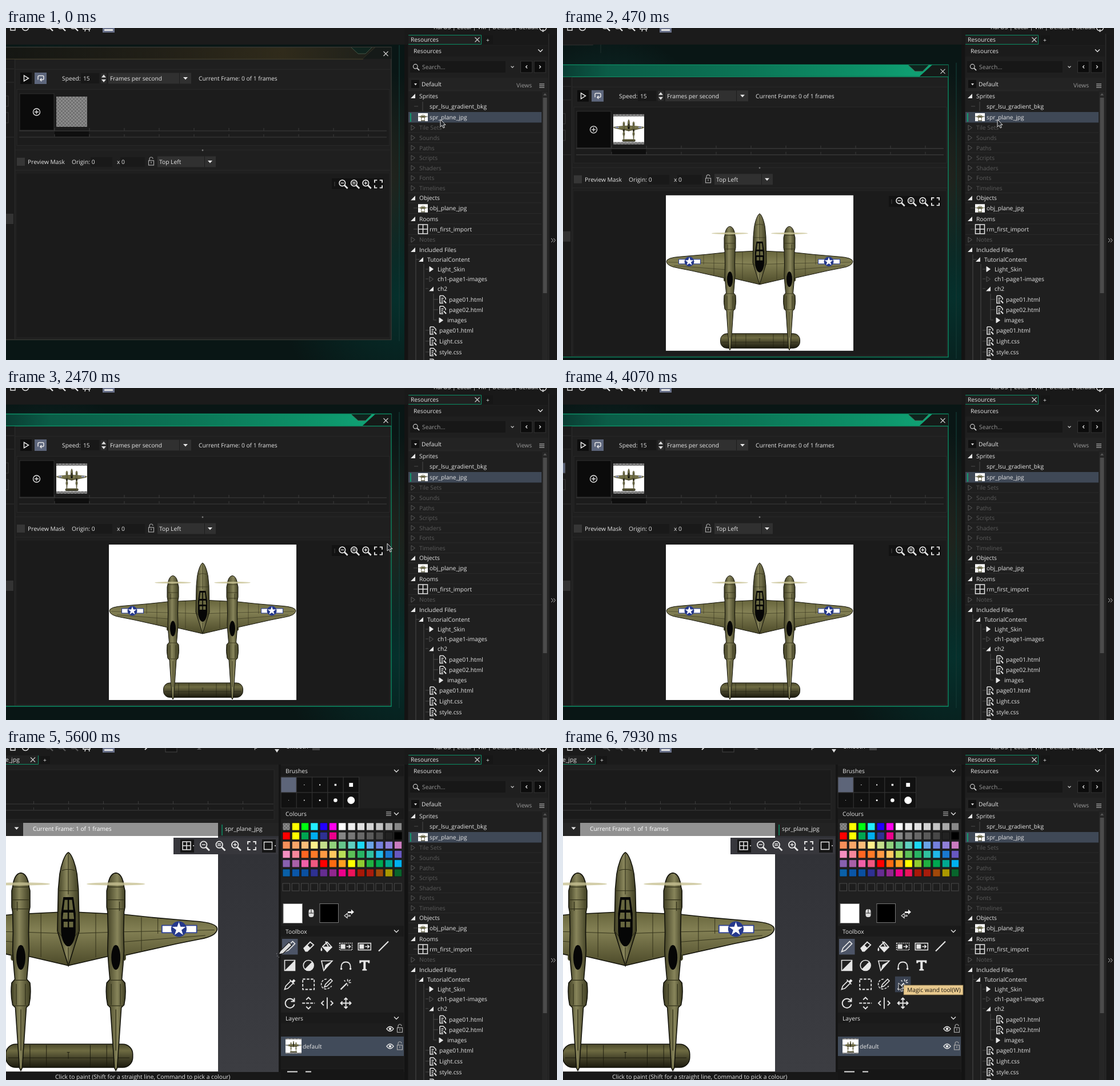
Recreate the animation shown at these times as an HTML page. Size 964 by 581 pixels, loop 8 s.

```html
<!DOCTYPE html>
<html lang="en">
<head>
<meta charset="utf-8">
<title>Sprite editor</title>
<style>
html, body { margin: 0; width: 100%; height: 100%; overflow: hidden; background: #1b1b1b; }
svg { display: block; width: 100vw; height: 100vh; }
text { font: 10.25px "Open Sans", "Noto Sans", sans-serif; text-rendering: geometricPrecision; white-space: pre; }
</style>
</head>
<body>
<svg id="stage" viewBox="0 0 964 581" xmlns="http://www.w3.org/2000/svg"></svg>
<script>
const WHITE = '#e6e6e6', DIM = '#5a5a5a', GREEN = '#0c8f66';
const rect = (x, y, w, h, fill, extra = '') =>
  `<rect x="${x}" y="${y}" width="${w}" height="${h}" fill="${fill}" ${extra}/>`;
const text = (x, y, s, fill = WHITE, extra = '') => `<text x="${x}" y="${y}" fill="${fill}" ${extra}>${s}</text>`;
const path = (d, fill = 'none', stroke = 'none', width = 1, extra = '') =>
  `<path d="${d}" fill="${fill}" stroke="${stroke}" stroke-width="${width}" ${extra}/>`;
const line = (d, stroke = WHITE, width = 1.5, extra = '') => path(d, 'none', stroke, width, extra);
const circle = (x, y, r, fill = 'none', stroke = 'none', width = 1) =>
  `<circle cx="${x}" cy="${y}" r="${r}" fill="${fill}" stroke="${stroke}" stroke-width="${width}"/>`;
const at = (x, y, body, scale = 1) => `<g transform="translate(${x} ${y}) scale(${scale})">${body}</g>`;
const group = (id, body, extra = '') => `<g id="${id}" ${extra}>${body}</g>`;
const range = n => [...Array(n).keys()];
const plane = (x, y, scale) => at(x, y, '<use href="#plane"/>', scale);
const gradient = (id, stops, dir = 'x2="1" y2="0"') => `<linearGradient id="${id}" ${dir}>` +
  stops.map(([o, c]) => `<stop offset="${o}" stop-color="${c}"/>`).join('') + '</linearGradient>';
const glow = (id, x, y, r, color) => `<radialGradient id="${id}" gradientUnits="userSpaceOnUse" cx="${x}" cy="${y}" r="${r}">
  <stop offset="0" stop-color="${color}"/><stop offset="1" stop-color="${color}" stop-opacity="0"/></radialGradient>`;

// Icons
const chevron = (x, y, c = WHITE, s = 4) => line(`M${x - s} ${y - s / 2}l${s} ${s}l${s} ${-s}`, c, 1.3);
const dropArrow = (x, y) => path(`M${x - 4} ${y - 2}h8l-4 4.5z`, WHITE);
const cross = (x, y, s = 4) => line(`M${x - s} ${y - s}l${2 * s} ${2 * s}m0 ${-2 * s}l${-2 * s} ${2 * s}`, '#ccc', 1.2);
const burger = (x, y) => line(`M${x - 4} ${y - 3}h9m-9 3h9m-9 3h9`, '#ccc', 1.2);
const zoom = (x, y, kind = '', c = WHITE, scale = 1) => at(x, y, circle(-1.5, -1.5, 4.8, 'none', c, 1.5) +
  line('M2 2L7 7', c, 2.4) + line({ '-': 'M-4-1.5h5', '=': 'M-4-2.7h5m-5 2.3h5', '+': 'M-4-1.5h5m-2.5-2.5v5' }[kind] || '', c, 1.2), scale);
const corners = (x, y, scale = 1) => at(x, y, line('M-6-2v-4h4m4 0h4v4m0 4v4h-4m-4 0h-4v-4', WHITE, 1.7), scale);
const lock = (x, y) => at(x, y, line('M-3-1v-3a3 3 0 0 1 6 0', '#aaa', 1.2) + rect(-4.5, -1, 9, 8, 'none', 'stroke="#aaa" stroke-width="1.2"') + rect(-.6, 1, 1.2, 3, '#aaa'));
const eye = (x, y) => at(x, y, line('M-6 0Q0-8 6 0Q0 8-6 0Z', WHITE, 1.4) + circle(0, 0, 2.3, WHITE));
const fileIcon = (x, y) => at(x, y, line('M-5-6.5h6l4 4v3M-5-6.5v13h6M-2.5-2h4m-4 3h3m-3 3h3', WHITE, 1.5) + line('M2 2l4 4.5', WHITE, 2));
const grid = (x, y, s) => line(`M${x - s} ${y - s}h${2 * s}v${2 * s}h${-2 * s}zm${s} 0v${2 * s}m${-s} ${-s}h${2 * s}`, WHITE, 1.5);

function planeArt() {
  const edge = '#12120a', seam = '#33321b';
  const star = 'M' + range(10).map(i => {
    const a = i * Math.PI / 5, r = i % 2 ? 3.1 : 7.8;
    return `${(41 + r * Math.sin(a)).toFixed(1)} ${(116 - r * Math.cos(a)).toFixed(1)}`;
  }).join('L') + 'Z';
  const badge = rect(22.5, 112, 38, 8, '#fff', 'stroke="#2c3f94" stroke-width="1.1"') + circle(41, 116, 8.5, '#26398c') + path(star, '#fff');
  const wing = path('M164 97L103 100L70 103.5L26 107.3Q1 109 1 116Q2 124 20 127L45 132L103 145L121 146L164 156Z', 'url(#wing)', edge) +
    line('M4 117L103 119L164 121M14 123L103 130M66 104v17M84 103v38M134 99v48', seam, .6) +
    path('M101 144h3v5l-1.500 2l-1.500-2z'.replace(/500/g, '5'), '#3f3e22');
  const boom = path('M112 54.500C117 55 120 61 121 70L122 74V92L121 97L120.500 120L121 140Q120 156 118.500 171L122 175Q123.500 188 121 199L118 202L113.500 268L112 271L110.500 268L106 202L103 199Q100.500 188 102 175L105.500 171Q104 156 103 140L103.500 120L103 97L102 92V74L103 70C104 61 107 55 112 54.500Z'.replace(/\.500/g, '.5'), 'url(#boom)', edge) +
    line('M103 70h18M102 84h20M102.5 94h19M105 172h14M104 200h16M108 86v10M107 176v23M117 176v23M112 204v45', seam, .8) +
    '<ellipse cx="112" cy="147" rx="5" ry="13.5" fill="#060606"/>' +
    '<ellipse cx="112" cy="66.6" rx="32" ry="1.6" fill="#c9c294" opacity=".8"/>';
  const flip = body => `<g transform="matrix(-1 0 0 1 328 0)">${body}</g>`;
  return rect(0, 0, 328, 272, '#fff') +
    rect(95.5, 242, 139, 25.5, 'url(#tail)', `rx="11" stroke="${edge}"`) +
    line('M98 257H231M122 243v24M140 243v24M188 243v24M206 243v24M164 251v7m-1.5-7h3', '#1d1c0e', .6) +
    wing + boom + flip(wing + boom) +
    path('M164 32C168 34 172 46 173.5 56L175 72L176 118L164 156L152 118L153 72L154.5 56C156 46 160 34 164 32Z', 'url(#boom)', edge) +
    line('M157 52Q164 49 171 52M164 33v45M153 74h22M152 118l12 14l12-14M164 136v20', seam, .7) +
    path('M158.5 81h11l2.5 18v18c0 10-4 18-8 18s-8-8-8-18v-18z', '#060606') +
    path('M160 84h3.2v11h-4.5zm4.8 0h3.2l1.300 11h-4.500zm-6.300 14h4.700v7h-5.500zm6.300 0h4.700l.8 7h-5.500zm-6 10h4.500v6h-4.500zm6 0h4.500v6h-4.500z'.replace(/00/g, ''), '#67663f') +
    badge + at(244, 0, badge);
}

const down = 'x2="0" y2="1"';
const defs = '<defs>' +
  gradient('wing', [[0, '#66643b'], [.35, '#838054'], [1, '#4c4a29']], down) +
  gradient('boom', [[0, '#3c3b20'], [.42, '#88855b'], [1, '#3c3b20']]) +
  gradient('tail', [[0, '#4a482a'], [.28, '#6e6b42'], [.6, '#45432a'], [1, '#1c1b0e']], down) +
  gradient('active', [[0, '#0a3d33'], [.12, '#0b5c47'], [.5, '#0b7556'], [.85, '#0d946a'], [1, '#10a476']]) +
  gradient('idle', [[0, '#151713'], [.4, '#211f17'], [.75, '#302b1b'], [1, '#1d1f1a']]) +
  gradient('canvas', [[0, '#303136'], [1, '#3c3d42']], down) +
  glow('glowTeal', 80, 190, 180, '#0e3432') + glow('glowGold', 590, 290, 230, '#2e2b22') +
  glow('glowBrown', 310, 400, 150, '#38291c') + glow('glowRight', 690, 470, 210, '#05302c') +
  '<pattern id="checker" width="6" height="6" patternUnits="userSpaceOnUse">' +
  rect(0, 0, 6, 6, '#8b8b8b') + rect(0, 0, 3, 3, '#707070') + rect(3, 3, 3, 3, '#707070') + '</pattern>' +
  '<clipPath id="workClip"><rect y="29" width="697" height="552"/></clipPath><clipPath id="editClip"><rect y="131" width="371" height="436"/></clipPath>' +
  group('plane', planeArt()) + '</defs>';

const topBar = zoomColor => rect(0, 0, 697, 29, '#1b1b1b') +
  line('M8-2v6h8v-6', '#ddd', 1.5) + circle(34, -1, 5.5, 'none', '#ddd', 1.5) +
  [75, 97, 119].map(x => zoom(x, -2, '', zoomColor)).join('') +
  line('M135-2v4h12v-4m-8 4l-1 4m7-4l1 4', '#ddd', 1.5) + rect(169, -2, 21, 10, '#69718a') + rect(172, 2, 15, 3, '#e6e6e6');

function workspace() {
  const full = fill => rect(0, 29, 697, 552, fill);
  return full('#091615') + ['Teal', 'Gold', 'Brown', 'Right'].map(g => full(`url(#glow${g})`)).join('');
}

const timeline = (x0, x1, y, first) => [y, y + 11].map(v => line(`M${x0} ${v}H${x1}`, '#3c3c3c', 1.2)).join('') +
  range(10).map(i => first + 61 * i).filter(x => x < x1).map(x => line(`M${x} ${y - 5}v5m0 6v4`, '#3c3c3c', 1)).join('');

function spriteWindow() {
  const previous = rect(-2, -326, 54, 337, '#1d1d1d', 'stroke="#303030"') + rect(0, -325, 51, 18, '#131816') + path('M0-325H16L2-306H0Z', '#37352b') +
    cross(42, -316) + rect(-2, -294, 47, 18, '#212121', 'stroke="#2c2c2c"') + rect(-2, -220, 47, 227, '#222', 'stroke="#2c2c2c"') +
    line('M66-330V25', '#20302f', 1);
  const dropdown = (x, y, w, split, s) => rect(x, y, w, 19, '#303030') + rect(split, y, 1, 19, '#1d1d1d') +
    dropArrow(x + w - 10, y + 9.5) + text(x + 3, y + 13.5, s);
  return previous + line('M688 42V560', '#123530') +
    rect(0, 46, 674, 511, '#1f1f1f') +
    group('idleHead', path('M0 46H646L624 66H0Z', 'url(#idle)') + line('M0 45.5H674V557.5H0', '#343632') + line('M0 66.5H624L646 46', '#3d392a')) +
    group('activeHead', path('M0 46H646L624 66H0Z', 'url(#active)') + line('M0 45.5H674V557H0M0 66.5H674', GREEN, 1.3)) +
    path('M646 46H674V66H624Z', '#151a18') + path('M604 46H640L629 57H616Z', '#10241e') + line('M604 46L616 57H629L640 46', '#4e604f', .8) +
    cross(664.5, 57) +
    rect(0, 67, 15, 489, '#1b1b1b') + line('M15.5 67V556M0 83.5H14M0 107H14M0 203H14', '#292929') +
    rect(-3, 131, 7, 18, '#1a1a1a', 'id="editButton" stroke="#3b3b3b"') + rect(-3, 160, 7, 18, '#1a1a1a', 'stroke="#3b3b3b"') + rect(0, 337, 13, 18, '#333') +
    line('M16 84.5H672M16 225.5H672M16 261H672', '#262626') +
    rect(25, 90, 20, 20, '#0d0d0d') + line('M31.5 95v10l8-5z', WHITE, 1.5) +
    rect(50, 90, 21, 20, '#5d667c') + line('M56 102.5v-5a2 2 0 0 1 2-2h6a2 2 0 0 1 2 2v3a2 2 0 0 1-2 2h-4m2.3-2.5l-2.5 2.5l2.5 2.8', WHITE, 1.5) +
    text(98, 104, 'Speed:') + rect(131, 91, 32, 18, '#181818') + text(135, 104, '15') +
    rect(166, 91, 10, 18, '#2b2b2b') + path('M167 98.5h8l-4-5zm0 3.5h8l-4 5z', '#ddd') +
    dropdown(179, 90.5, 145, 303, 'Frames per second') + text(337, 104, 'Current Frame: 0 of 1 frames') +
    rect(19, 119.5, 652, 98, '#1c1c1c', 'stroke="#282828"') + rect(24, 127, 60, 64, '#0b0b0b', 'stroke="#303030"') +
    circle(53.5, 159, 6, 'none', WHITE, 1.3) + line('M50 159h7m-3.5-3.5v7', WHITE, 1.3) +
    rect(88, 132, 54, 53, 'url(#checker)') + group('frameThumb', plane(88, 136, .1646)) +
    rect(85, 193, 60, 9, '#0e0e0e') + timeline(23, 666, 192, 85) + circle(344, 226, 1.4, '#777') +
    rect(19, 239, 14, 14, '#363636') + text(38, 250, 'Preview Mask') + rect(148, 238, 38, 17, '#191919') + rect(200, 238, 43, 17, '#191919') +
    text(115, 250, 'Origin: 0') + text(194, 250, 'x 0') + lock(254, 245) + dropdown(265, 236.5, 102, 347, 'Top Left') +
    rect(18, 266, 653, 288, '#1b1b1b', 'stroke="#242424"') + group('preview', plane(180, 274, 1)) +
    rect(570, 275, 91, 19, '#121212') + line('M575 281v8', '#444', 1) +
    zoom(590, 285, '-', WHITE, 1.1) + zoom(610.5, 285, '=', WHITE, 1.1) + zoom(631, 285, '+', WHITE, 1.1) + corners(651.5, 285, 1.1);
}

const toolX = i => 496.5 + 32.7 * i, toolY = j => 347.5 + 33 * j;
function tools() {
  const arrows = 'M-4-6L0-10L4-6M-4 6L0 10L4 6';
  const rows = [[
    line('M-9 9l2.5-6.5L5-9l4 4L-2.5 6.5Z', WHITE, 1.7),
    line('M-8 3L3-8L9-3L-2 8H-5Z', WHITE, 1.8) + path('M-8 3L-2-3L4 3L-2 8H-5Z', WHITE),
    line('M-8 0L0-8L8 1L0 9Z M-3-9L2 0', WHITE, 1.8) + path('M-8 0H8L0 9ZM-10 1q-3 6 0 7q3-1 0-7', WHITE),
    line('M-11-6H11V6H-11Z', WHITE, 1.5, 'stroke-dasharray="2 1.5"') + rect(-9, -4, 8, 8, WHITE) + line('M1 0h7m-3-3l3 3l-3 3', WHITE, 1.6),
    line('M-11-6H11V6H-11Z', WHITE, 1.5) + rect(-9, -4, 8, 8, WHITE) + line('M1 0h7m-3-3l3 3l-3 3', WHITE, 1.6),
    line('M-8 8L9-9', WHITE, 2.2)
  ], [
    line('M-9-9H9V9H-9Z', WHITE, 1.6) + path('M-9 9L9-9V9Z', WHITE),
    circle(0, 0, 9, 'none', WHITE, 1.6) + path('M-6.4 6.4L6.4-6.4A9 9 0 0 1-6.4 6.4', WHITE),
    line('M-10-8H9L-6 9Z', WHITE, 1.6) + path('M9-8L-6 9L-3-1Z', WHITE),
    line('M-8 6Q-9-6 0-6T8 6', WHITE, 1.8) + circle(-8, 6, 1.8, WHITE) + circle(8, 6, 1.8, WHITE),
    path('M-9-9H9v5H6.5l-1-2H2V6l2 1v2H-4V7l2-1V-6h-3.5l-1 2H-9z', WHITE)
  ], [
    line('M-9 9l2-6L2-6L6-2L-3 7Z M0-8L8 0', WHITE, 1.7) + path('M3-5l4-4l3 3l-4 4z', WHITE),
    line('M-10-9H10V9H-10Z', WHITE, 1.8, 'stroke-dasharray="4.5 2.5"'),
    line('M-5 5l2-5L6-9l3 3L0 3Z', WHITE, 1.6) + line('M-1-9A9 9 0 0 0-7 7Q0 11 8 3', WHITE, 1.5, 'stroke-dasharray="4 2"'),
    line('M-9 9L2-2', WHITE, 2.4) + line('M3-9v4M9-3H5M-3-7l2 2M8-8L5-5M3 0v3', WHITE, 1.6)
  ], [
    line('M7-4A8 8 0 1 0 8 2M8-9v6H2', WHITE, 1.9),
    line(arrows, WHITE, 1.8) + line('M-11 0H11', WHITE, 1.8, 'stroke-dasharray="5 2"'),
    line(arrows, WHITE, 1.8, 'transform="rotate(90)"') + line('M0-10V10', WHITE, 1.8),
    line('M0-9V9M-9 0H9M-3-6L0-9L3-6M-3 6L0 9L3 6M-6-3L-9 0L-6 3M6-3L9 0L6 3', WHITE, 1.8)
  ]];
  return rows.map((row, j) => row.map((icon, i) => at(toolX(i), toolY(j), icon)).join('')).join('');
}

const palette = ('url(#checker) #ff0 #0f1 #2ef #20f #f0e #fff #eee #e1e1e1 #d4d4d4 #c4c4c4 #aaa #888 ' +
  '#f00 #ff0 #00a651 #00aeef #2e3192 #ec008c #868686 #777 #686868 #5a5a5a #484848 #222 #000 ' +
  '#f7905a #f9a668 #fdbd7a #fff08c #c4df8b #90d07c #66c58c #5fcfc0 #1cd8f5 #6aa4e8 #7480dd #9080d8 #cb7cc0 ' +
  '#f48fc0 #f5879a #ff6622 #ff7a28 #ff9a44 #ffc860 #b8de58 #5cc058 #28b464 #30c0a0 #20b8e8 #1a78d0 #6858c0 ' +
  '#8860b0 #a860a8 #f060a8 #f05880 #f00 #ff6a10 #ffa020 #ff0 #90cc30 #20b040 #00a850 #00a890 #00b0f0 ' +
  '#0a60a8 #0a56a8 #0a50a0 #2e3192 #652d91 #92278f #ec008c #ed145b #a81808 #a81c0c #a0480a #aa9800 #08652c').split(' ');

function editor() {
  const heading = (y, s) => rect(481, y - 9.5, 215, 19, '#1a1a1a') + text(489, y + 4, s) + chevron(683, y);
  const brushes = range(10).map(n => {
    const i = n % 5, j = n / 5 | 0, x = 494.5 + 27.3 * i, y = 64.5 + 27 * j, r = [.5, .9, 1.5, 3.3, 6.5][i];
    const s = [0, .6, 1, 1.7, 3.4][i];
    return rect(x - 13.5, y - 13.5, 27.3, 27, n ? '#111' : '#5d6579', 'stroke="#333"') +
      (j ? circle(x, y, r, '#fff') : i ? rect(x - s, y - s, 2 * s, 2 * s, '#fff') : '');
  }).join('');
  const swatches = palette.map((c, n) => rect(484 + 16.3 * (n % 13), 131 + 16.2 * (n / 13 | 0), 13, 13, c, 'stroke="#0d0d0d" stroke-width=".6"')).join('') +
    range(13).map(i => rect(484 + 16.3 * i, 237, 12.5, 13, '#1d1d1d', 'stroke="#494949"')).join('');
  return topBar('#555') + line('M243 3l5-5', '#ddd', 2) + rect(279, -3, 20, 10, '#141414', 'stroke="#444"') + path('M334 3l4-4l4 4z', '#555') +
    text(434, 1, 'p') + path('M470 2h8l-4 6z', '#ddd') + text(491, 1, 'Smooth') + rect(536, -3, 13, 7, '#444') +
    rect(0, 13, 57, 16, '#222') + text(-1, 24, 'e_jpg') + cross(47, 20.5) + line('M0 28.5H56.5V13', GREEN, 1) + rect(59, 14, 18, 14, '#161616') + text(65, 25, '+') +
    rect(0, 29, 697, 552, '#202020') + rect(-1, 38, 470, 87, '#1b1b1b', 'stroke="#292929"') + timeline(0, 468, 98, 48.5) +
    rect(371, 153, 106, 414, 'url(#canvas)') + rect(371, 131, 106, 23, '#232323') + line('M378 134V153', GREEN, 1.5) + text(383, 144.5, 'spr_plane_jpg') +
    `<g clip-path="url(#editClip)">${plane(-153, 131.5, 1.598)}</g>` + rect(30, 131, 341, 23, '#929292') +
    rect(0, 131, 30, 23, '#262626') + dropArrow(18.5, 140.5) + text(47, 144.5, 'Current Frame: 1 of 1 frames', '#fff') +
    rect(293, 157, 183, 29, '#37373c') + rect(305, 160, 24, 23, '#151515') + rect(448, 160, 24, 23, '#151515') +
    grid(316, 171, 7) + zoom(347.5, 171, '-', WHITE, 1.2) + zoom(375, 171, '=', WHITE, 1.2) + zoom(402.5, 171, '+', WHITE, 1.2) + corners(430, 171, 1.15) +
    line('M451.5 164.5h14v13h-14z', WHITE, 1.4) + circle(328, 171, 1, WHITE) + circle(471, 171, 1, WHITE) +
    rect(0, 567, 697, 14, '#181818') + rect(477, 29, 4, 538, '#151515') +
    heading(40, 'Brushes') + brushes + heading(115, 'Colours') + burger(669, 115) + swatches +
    rect(485, 272.5, 33.5, 34, '#fff', 'stroke="#777"') + rect(549, 272.5, 32.5, 33, '#000', 'stroke="#777"') +
    at(534, 289, rect(-4.5, -7, 9, 14, '#ddd', 'rx="4"') + line('M-4 0H4M0-7V0', '#222', 1)) +
    at(600, 289, path('M-2-3H4V-6.5L9-2L4 2.5V0H-2Z', '#eee') + line('M2 3.5h-5v-3l-5 4l5 4v-3h5z', WHITE, 1.1)) +
    heading(320.5, 'Toolbox') + rect(483, 334, 27.5, 27.5, '#4d5567') + rect(0, 0, 27.5, 27.5, '#394150', 'id="hover"') + tools() +
    heading(472.5, 'Layers') + rect(481, 482, 215, 23, '#1d1d1d') + eye(672, 491.5) + lock(689, 490.5) +
    rect(481, 505, 215, 34, '#414b5a') + rect(489, 508, 28, 27, 'url(#checker)') + plane(489, 510, .0854) + text(519, 525.5, 'default') + eye(672, 522) + lock(689, 521) +
    rect(481, 539, 215, 22, '#1b1b1b') + rect(481, 562, 215, 19, '#161616') + line('M492 566.5h18M524 566.5h10', '#ddd', 2) +
    text(86, 578.5, 'Click to paint (Shift for a straight line, Command to pick a colour)');
}

function resources() {
  const tri = (x, y, open, c) => open ? path(`M${x - 4} ${y + 4}h8v-8z`, c) : path(`M${x - 3} ${y - 4.5}v9l6.5-4.5z`, c === DIM ? 'none' : c, c, 1);
  const node = (x, y, s, open = false, c = WHITE) => tri(x - 11, y, open, c) + text(x, y + 3.8, s, c);
  const file = (x, y, s) => fileIcon(x - 11, y) + text(x, y + 3.8, s);
  const sprite = (y, s) => rect(721, y - 7, 17, 14, '#fff') + plane(721, y - 7, .0518) + text(741, y + 3.8, s);
  const closed = ['Tile Sets', 'Sounds', 'Paths', 'Scripts', 'Shaders', 'Fonts', 'Timelines'];
  const rules = [...closed.map((_, i) => 183 + 17.6 * i), 109, 306, 324.5, 343, 361.5, 379.5].map(y => line(`M704 ${y}H937`, '#2a2a2a', 1)).join('');
  return rect(697, 0, 267, 581, '#191919') + rect(697, 29, 6, 552, '#131313') + rect(704, 30, 244, 551, '#1f1f1f') +
    text(748, 1.5, 'nurOS | Local | VM | Default | default') + circle(939.5, -1, 6, 'none', WHITE, 1.4) + line('M939.5 2v5', WHITE) +
    rect(704, 12, 128, 17, '#202020') + line('M704 12.5H831.5V28.5H704', GREEN, 1) + text(708, 24, 'Resources') + cross(824.5, 20.5) +
    rect(835, 13, 17, 15, '#161616') + text(840, 24.5, '+') +
    rect(704, 31, 244, 19, '#1b1b1b') + text(713, 43.5, 'Resources') + chevron(935, 39.5) +
    rect(707, 58, 167, 20, '#171717') + zoom(717.5, 68.5, '', '#ccc', .8) + text(728, 72, 'Search...', '#999') + chevron(886, 68, '#bbb', 2.5) +
    rect(900.5, 58, 20, 20, '#0c0c0c', 'stroke="#333"') + rect(924, 58, 20, 20, '#0c0c0c', 'stroke="#333"') +
    line('M912 65.5l-2.5 2.5l2.5 2.5M933 65.5l2.5 2.5l-2.5 2.5', WHITE, 1.2) +
    rect(704, 87, 244, 24, '#232323') + rect(709, 91, 14, 14, '#111') + path('M714 97h5l-2.5 3.5z', '#ddd') + text(727, 101.5, 'Default') + text(893, 104, 'Views', '#999') + burger(937, 101) +
    rules + rect(704, 147, 233, 18.5, '#3f4856') + rect(707, 149, 2, 15, '#129a70') +
    line('M714 137h7m-7 19h7M729 129v16M713 315h7m-7 37h7M717 396v185M717 405h7M731 413v168M734 422h5m-5 17h5m-5 17h5m-5 73h6m-6 19h6m-6 19h6M748 465v46h5m-5-36h8m-8 18h8', '#4b4b4b', 1) +
    node(723, 119, 'Sprites', true) + text(741, 141, 'spr_lsu_gradient_bkg') + sprite(156, 'spr_plane_jpg') +
    closed.map((s, i) => node(723, 174.5 + 17.6 * i, s, false, DIM)).join('') +
    node(723, 297.5, 'Objects', true) + sprite(315.5, 'obj_plane_jpg') + node(723, 334, 'Rooms', true) +
    grid(729.5, 352, 8) + text(741, 355.8, 'rm_first_import') + node(723, 370.5, 'Notes', false, DIM) +
    node(723, 388, 'Included Files', true) + node(737, 405, 'TutorialContent', true) + node(755, 422, 'Light_Skin') +
    tri(744, 439.5, false, DIM) + text(755, 443.3, 'ch1-page1-images') + node(755, 456.5, 'ch2', true) +
    file(775, 475, 'page01.html') + file(775, 493.5, 'page02.html') + node(772, 511.5, 'images') +
    file(758, 529.5, 'page01.html') + file(758, 548.5, 'Light.css') + file(758, 567, 'style.css') + line('M741 579.5h6l4 4', WHITE) +
    rect(938, 112, 10, 469, '#262626') + path('M940 118h6l-3-4z', '#555') + rect(939.5, 122, 7, 342, '#4b4b4b') +
    rect(948, 12, 16, 569, '#181818') + line('M949.5 10V581', '#2d2d2d') + line('M954 368l3 3.5l-3 3.5m4-7l3 3.5l-3 3.5', '#bbb', 1);
}

const stage = document.getElementById('stage');
stage.innerHTML = defs +
  group('windowScene', topBar(WHITE) + workspace() + `<g clip-path="url(#workClip)">${group('win', spriteWindow())}</g>`) +
  group('editScene', editor()) + resources() +
  group('tip', rect(596, 415, 104, 17, '#e8c98e', 'stroke="#71603f" stroke-width=".8"') + text(602, 427, 'Magic wand tool(W)', '#1c1710')) +
  group('cursor',
    group('arrow', path('M0 0V13L3 10.3L5.2 15L7.4 14L5.2 9.5H9Z', '#22252a', '#e2e2e2', 1)) +
    group('pen', path('M2-2L5-8L20-23L25-18L10-3.5Z', '#ddd', '#1a1a1a', 1.2) + line('M-1 1h1M-2-3h1M2 3h1', '#aaa', 1.2)));

const el = {};
stage.querySelectorAll('[id]').forEach(n => el[n.id] = n);
const show = (name, on) => el[name].setAttribute('display', on ? 'inline' : 'none');
const move = (name, x, y) => el[name].setAttribute('transform', `translate(${x.toFixed(2)} ${y.toFixed(2)})`);

const LOOP = 8000, EDIT = 4530;
// Pointer way points: time, x, y
const route = [[0, 760, 160], [600, 760, 160], [1130, 414, 340], [1270, 414, 340], [1470, 628, 310], [1600, 628, 310],
  [1870, 575, 356], [2070, 575, 356], [2470, 667, 272], [2870, 366, 184], [3000, 366, 184], [3130, 293, 179],
  [5200, 64, 182], [5600, 475, 363], [6000, 527, 404], [6300, 489, 397], [6870, 564, 443], [7330, 589, 413], [7470, 587, 411], [8000, 587, 411]];

function pointer(t) {
  const i = Math.max(1, route.findIndex(p => p[0] > t));
  const [a, b] = [route[i - 1], route[i]], k = (t - a[0]) / (b[0] - a[0]);
  return [a[1] + (b[1] - a[1]) * k, a[2] + (b[2] - a[2]) * k];
}

// Motion advances fifteen times a second, on times rounded to 10 ms
function stepTime(t) {
  const time = k => Math.round(k * 20 / 3) * 10;
  const k = Math.floor((t + 4) * 3 / 200);
  return time(k) > t ? time(k - 1) : time(k);
}

function draw(now) {
  const t = now % LOOP, s = stepTime(t), opened = t >= 70, editing = t >= EDIT;
  show('windowScene', !editing);
  show('editScene', editing);
  move('win', 0, !opened ? -12 : s >= 530 ? 0 : 353 * ((530 - s) / 260) ** 2);
  show('idleHead', !opened);
  ['activeHead', 'frameThumb', 'preview'].forEach(n => show(n, opened));
  el.editButton.setAttribute('fill', t >= 3600 ? '#5d667c' : '#1a1a1a');

  const [x, y] = pointer(s), drawing = editing && x < 481;
  show('cursor', t < 3600 || t >= 5200);
  move('cursor', x, y);
  show('pen', drawing);
  show('arrow', !drawing);

  const i = Math.round((x - toolX(0)) / 32.7), j = Math.round((y - toolY(0)) / 33);
  const inside = Math.abs(x - toolX(i)) < 13.7 && Math.abs(y - toolY(j)) < 13.7;
  show('hover', t >= 5200 && x > 481 && inside);
  move('hover', toolX(i) - 13.7, toolY(j) - 13.7);
  show('tip', t >= 7870);
}

const start = performance.now();
(function tick() {
  draw(performance.now() - start);
  requestAnimationFrame(tick);
})();
</script>
</body>
</html>
```
